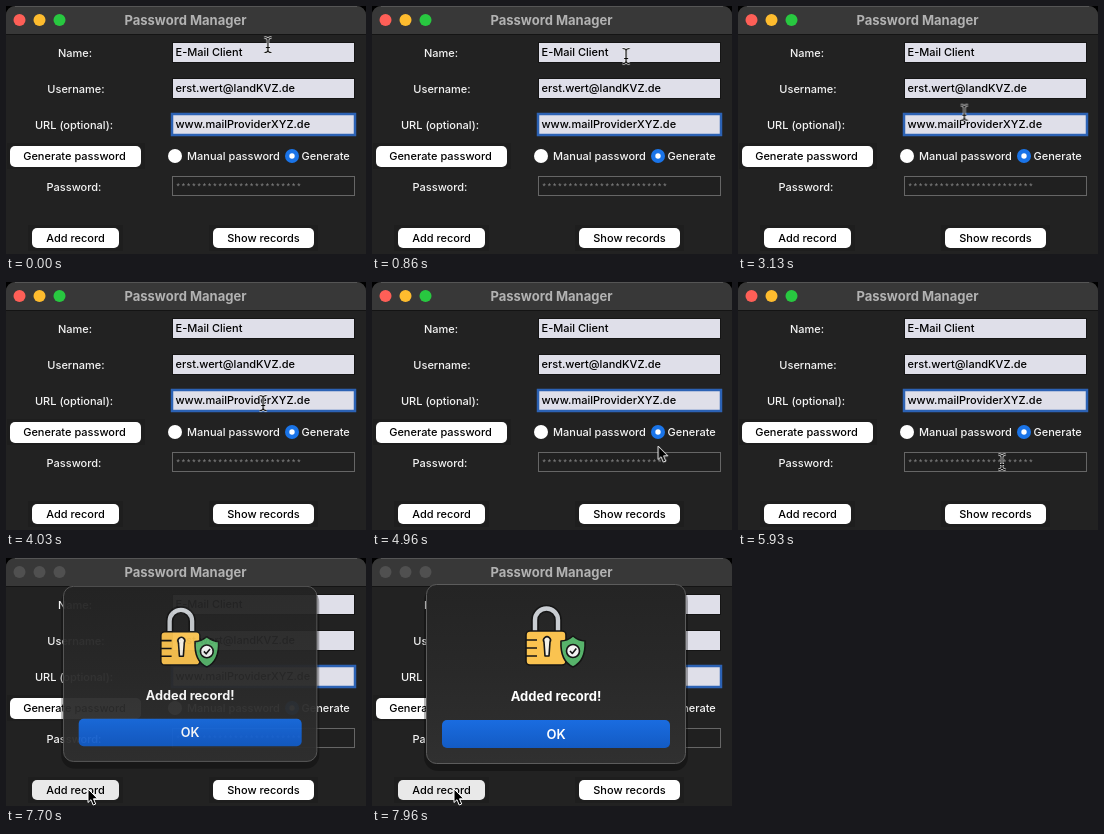
Recreate the animation shown at these times as an HTML page. Size 360 by 248 pixels, loop 8 s.

```html
<!DOCTYPE html>
<html lang="en">
<head>
<meta charset="utf-8">
<title>Password Manager</title>
<style>
html, body { margin: 0; width: 100%; height: 100%; overflow: hidden; background: #000; }
svg { display: block; width: 360px; height: 248px; font: 500 11px Inter, "Open Sans", sans-serif; }
.mid { text-anchor: middle; }
.light { fill: #f4f4f4; }
.heading { font-size: 13px; font-weight: 700; }
.entry { fill: #dfdfe9; stroke: #151515; }
.button { fill: #fff; }
.patch { fill: #1e1e1e; }
.stars { font: 8.75px "Liberation Mono", monospace; fill: #858585; }

/* Everything shares one 8 s clock. */
.lamp, .caret, .pressed, .pointer, .ibeam, .arrow, .alert, .title {
  animation: 8s linear infinite;
}
.lamp { animation-name: lamp; animation-timing-function: step-end; }
.title { fill: #b2b2b2; }
.pressed { animation-name: press; animation-timing-function: step-end; }
.pointer { animation-name: wander; }
.ibeam { animation-name: text-cursor; animation-timing-function: step-end; }
.arrow { animation-name: arrow-cursor; animation-timing-function: step-end; }
.alert { animation-name: open; transform-origin: 184px 116px; }
.caret-focus { animation: focus 8s step-end infinite; }
.caret { animation: blink .9s .28s step-end infinite backwards; opacity: 0; }

@keyframes lamp { 93.75%, 100% { fill: #505050; } }
@keyframes press { 91.25%, 100% { fill: #e9e9e9; } }
@keyframes focus { 0% { opacity: 1; } 93%, 100% { opacity: 0; } }
@keyframes wander {
  0% { transform: translate(262px, 39px); }
  2.5% { transform: translate(226px, 45px); }
  5% { transform: translate(200px, 48px); }
  10.75% { transform: translate(254px, 50px); }
  14.375% { transform: translate(275px, 53px); }
  18.75% { transform: translate(215px, 80px); }
  21.25% { transform: translate(195px, 83px); }
  28.25% { transform: translate(228px, 84px); }
  35% { transform: translate(275px, 86px); }
  38.75% { transform: translate(230px, 105px); }
  42.25% { transform: translate(197px, 120px); }
  50.375% { transform: translate(257px, 121px); }
  53.125% { transform: translate(290px, 124px); }
  56.25%, 59.125% { transform: translate(313px, 151px); }
  63.75% { transform: translate(270px, 172px); }
  66.875% { transform: translate(228px, 180px); }
  74.125% { transform: translate(264px, 180px); }
  75.625% { transform: translate(270px, 181px); }
  79.5% { transform: translate(111px, 212px); }
  83.75% { transform: translate(84px, 230px); }
  87.5%, 100% { transform: translate(82px, 231px); }
}
@keyframes text-cursor {
  0%, 17.5%, 39%, 63.3% { opacity: 1; }
  15%, 36.4%, 53.8%, 76.75%, 100% { opacity: 0; }
}
@keyframes arrow-cursor {
  0%, 17.5%, 39%, 63.3% { opacity: 0; }
  15%, 36.4%, 53.8%, 76.75%, 100% { opacity: 1; }
}
@keyframes open {
  0%, 93.7% { opacity: 0; transform: translate(3px, -2px) scale(.15); }
  94.125% { opacity: .3; transform: translate(3px, -2px) scale(.17); }
  96.4% { opacity: 1; transform: translate(0, 0) scale(1.03); }
  97.4%, 100% { opacity: 1; transform: none; }
}
</style>
</head>
<body>
<svg viewBox="0 0 360 248">
  <defs>
    <linearGradient id="glass" x2="0" y2="1">
      <stop stop-color="#242424"/><stop offset=".5" stop-color="#292929"/><stop offset="1" stop-color="#303030"/>
    </linearGradient>
    <linearGradient id="blue" x2="0" y2="1">
      <stop stop-color="#1a6ce0"/><stop offset="1" stop-color="#135bc4"/>
    </linearGradient>
    <clipPath id="window"><rect width="360" height="258" rx="9"/></clipPath>
  </defs>

  <g clip-path="url(#window)">
    <rect width="360" height="248" fill="#222"/>
    <rect width="360" height="28" fill="#383838"/>
    <path d="M0 28.5H360" stroke="#141414"/>
    <path d="M9 .5H351" stroke="#555"/>
  </g>
  <circle class="lamp" cx="13.5" cy="14" r="6" fill="#fe5f57"/>
  <circle class="lamp" cx="33.5" cy="14" r="6" fill="#febc2e"/>
  <circle class="lamp" cx="53.5" cy="14" r="6" fill="#28c840"/>
  <text class="mid heading title" x="179.5" y="18.5">Password Manager</text>

  <g class="mid light">
    <text x="69" y="51">Name:</text>
    <text x="70" y="87">Username:</text>
    <text x="68" y="123">URL (optional):</text>
    <text x="68" y="185">Password:</text>
  </g>

  <rect class="entry" x="166.5" y="36.5" width="182" height="20"/>
  <rect class="entry" x="166.5" y="72.5" width="182" height="20"/>
  <rect x="166" y="108" width="183" height="21" fill="#dfdfe9" stroke="#2c62b4" stroke-width="2.5"/>
  <rect x="166.5" y="170.5" width="182" height="19" fill="#202020" stroke="#666"/>
  <text x="169.5" y="50">E-Mail Client</text>
  <text x="169.5" y="86">erst.wert@landKVZ.de</text>
  <text x="169.5" y="122">www.mailProviderXYZ.de</text>
  <text class="stars" x="169.5" y="184">************************</text>
  <g class="caret-focus"><rect class="caret" x="303" y="111" width="1" height="14"/></g>

  <rect class="patch" x="1" y="137" width="138" height="26"/>
  <rect class="patch" x="22" y="219" width="95" height="26"/>
  <rect class="patch" x="203" y="219" width="109" height="26"/>
  <rect class="button" x="4" y="140" width="131" height="21" rx="5"/>
  <rect class="button pressed" x="26" y="222" width="87" height="20" rx="5"/>
  <rect class="button" x="207" y="222" width="101" height="20" rx="5"/>
  <g class="mid">
    <text x="68.5" y="154">Generate password</text>
    <text x="69.5" y="236">Add record</text>
    <text x="257.5" y="236">Show records</text>
  </g>

  <circle cx="169" cy="150" r="7" fill="#fff"/>
  <circle cx="286" cy="150" r="7" fill="#1a74e8"/>
  <circle cx="286" cy="150" r="2.7" fill="#fff"/>
  <text class="light" x="181" y="154">Manual password</text>
  <text class="light" x="295.5" y="154">Generate</text>

  <g class="alert">
    <rect x="52" y="29" width="264" height="184" rx="14" fill="#000" opacity=".3"/>
    <rect x="54.5" y="26.5" width="259" height="179" rx="10" fill="url(#glass)" stroke="#5c5c5c"/>
    <g stroke="#151515" stroke-width="1.6" stroke-linejoin="round">
      <path d="M160 74V62a14.500 14.500 0 0 1 29 0V74H183V62a8.500 8.500 0 0 0-17 0V74Z" fill="#c9cdd2"/>
      <rect x="154" y="73" width="40" height="34" rx="4" fill="#fac350"/>
      <path d="M154 82h11M154 90h11M154 98h11" fill="none"/>
      <path d="M172 84a3.500 3.500 0 1 1 6 0l-1 14h-4Z" fill="#f4f0e6"/>
      <path d="M201 78q6 5 12 5q1 20-12 26q-13-6-12-26q6 0 12-5Z" fill="#57b36b"/>
      <circle cx="201" cy="93" r="6.500" fill="#f3f3f3"/>
      <path d="m198 93 2.300 2.500 4-5" fill="none"/>
    </g>
    <text class="mid heading" x="184" y="143" fill="#fff">Added record!</text>
    <rect x="70" y="162" width="228" height="28" rx="5" fill="url(#blue)"/>
    <text class="mid" x="184" y="180.500" fill="#fff" font-weight="600" style="font-size:13px">OK</text>
  </g>

  <g class="pointer">
    <g class="ibeam" fill="none">
      <path id="beam" d="M-3.500-7.500Q0-7.500 0-5V5Q0 7.500-3.500 7.500M3.500-7.500Q0-7.500 0-5M0 5Q0 7.500 3.500 7.500M-2 2.500H2" stroke="#fff" stroke-width="2.600"/>
      <path d="M-3.500-7.500Q0-7.500 0-5V5Q0 7.500-3.500 7.500M3.500-7.500Q0-7.500 0-5M0 5Q0 7.500 3.500 7.500M-2 2.500H2" stroke="#000" stroke-width="1.200"/>
    </g>
    <path class="arrow" d="M0 0V13.500L3 10.700 5.200 16 7.700 15 5.500 9.800H9.700Z" fill="#000" stroke="#fff" stroke-linejoin="round"/>
  </g>
</svg>
</body>
</html>
```
